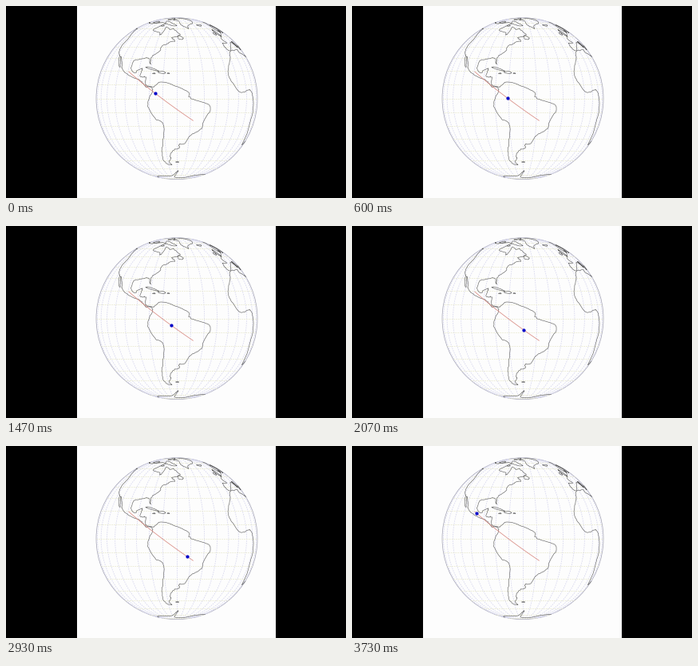
Animation, 426 px wide and 240 px high, one loop 3790 ms. Source, as a matplotlib script:

```python
import numpy as np
import matplotlib.pyplot as plt
from matplotlib.animation import FuncAnimation
from matplotlib.patches import Circle, Rectangle

W, H, DPI = 426, 240, 100
FRAMES, LOOP_MS = 57, 3790
CX, CY, R = 214.0, 115.7, 101.0
LON0 = -60
PAPER, COAST, RIM = "#fdfdfd", "#5c5c5c", "#a0a0b2"
MERIDIAN, PARALLEL = "#d6d6ee", "#e8e8cc"
ROUTE, DOT = "#d88880", "#0000c8"
START, END = (-99.1, 19.4), (-47.9, -15.8)
STEPS, FIRST = 96, 43

rng = np.random.default_rng(4)


def px(width):
    """Line width in pixels, given to matplotlib in points."""
    return width * 72 / DPI


def sphere(lon, lat):
    lon, lat = np.radians(np.asarray(lon, float) - LON0), np.radians(lat)
    return np.array([np.cos(lat) * np.sin(lon),
                     np.sin(lat) * np.ones_like(lon),
                     np.cos(lat) * np.cos(lon)])


def to_stage(p):
    """Orthographic view of the near side; the far side is dropped."""
    hidden = p[2] < -1e-6
    return (np.where(hidden, np.nan, CX + R * p[0]),
            np.where(hidden, np.nan, CY - R * p[1]))


def along_route(f):
    a, b = sphere(*START), sphere(*END)
    w = np.arccos(a @ b)
    f = np.asarray(f, float)
    return to_stage((np.multiply.outer(a, np.sin((1 - f) * w))
                     + np.multiply.outer(b, np.sin(f * w))) / np.sin(w))


def smooth(points, n=6):
    """Catmull-Rom curve through the key points."""
    p = np.array(points, float)
    p = np.vstack([2 * p[0] - p[1], p, 2 * p[-1] - p[-2]])
    t = np.arange(n)[:, None] / n
    a, b, c, d = p[:-3, None], p[1:-2, None], p[2:-1, None], p[3:, None]
    curve = b + ((c - a) * t + (2 * a - 5 * b + 4 * c - d) * t**2
                 + (3 * b - a - 3 * c + d) * t**3) / 2
    return np.vstack([curve.reshape(-1, 2), p[-2]])


fig = plt.figure(figsize=(W / DPI, H / DPI), dpi=DPI, facecolor="black")
ax = fig.add_axes([0, 0, 1, 1])
ax.set_xlim(0, W)
ax.set_ylim(H, 0)
ax.axis("off")
ax.add_patch(Rectangle((89, 0), 249, H, color=PAPER, lw=0))


def trace(lon, lat, color, width, **style):
    ax.plot(*to_stage(sphere(lon, lat)), color=color, lw=px(width), **style)


def coast(points):
    curve = smooth(points)
    curve[1:-1] += rng.normal(0, 0.22, curve[1:-1].shape)
    trace(*curve.T, COAST, 0.6)


def island(lon, lat, length, height, tilt):
    a, turn = np.linspace(0, 2 * np.pi, 25), np.radians(tilt)
    rough = 1 + 0.12 * np.sin(3 * a + lon) + 0.08 * np.sin(5 * a + lat)
    u, v = length * rough * np.cos(a), height * rough * np.sin(a)
    trace(lon + u * np.cos(turn) - v * np.sin(turn),
          lat + u * np.sin(turn) + v * np.cos(turn), COAST, 0.6)


# Graticule
span = np.linspace(-80, 80, 121)
for lon in range(-140, 21, 10):
    trace(np.full_like(span, lon), span, MERIDIAN, 0.8, dashes=(2, 1.5))
around = np.linspace(LON0 - 90, LON0 + 90, 121)
for lat in range(-80, 81, 10):
    trace(around, lat, PARALLEL, 0.8, dashes=(2, 1.5))
ax.add_patch(Circle((CX, CY), R, fill=False, ec=RIM, lw=px(0.7)))

# North and Central America, Pacific side
coast([(-150, 60), (-140, 59.8), (-131, 55), (-124, 48), (-124.3, 40.5),
       (-120.6, 34.6), (-117, 32.3), (-114.5, 28), (-110, 22.9),
       (-112.5, 28.4), (-114.5, 31.5), (-109.3, 25.9), (-105.5, 20.5),
       (-96, 15.8), (-87.7, 12.9), (-83, 8.3), (-79.5, 8.5), (-77.5, 6.5)])
# South America
coast([(-77.5, 6.5), (-80.5, -1.5), (-81, -5.5), (-76.3, -14), (-70.3, -18.5),
       (-71.6, -31), (-73.7, -39), (-75, -48), (-72.5, -53.5), (-66, -55),
       (-68.8, -51.5), (-66, -47.5), (-67, -45.5), (-64.8, -41.5), (-62, -39),
       (-57.5, -37.5), (-58, -34.3), (-53.5, -33.8), (-48.6, -27),
       (-41.5, -22.5), (-39, -15), (-34.9, -7), (-39, -3.3), (-50, 0),
       (-52, 4.8), (-61, 9), (-71.5, 11.8), (-76.8, 8.3)])
# Caribbean, Gulf and Atlantic side
coast([(-76.8, 8.3), (-81, 8.9), (-83.6, 11), (-83.5, 15.3), (-88.3, 16),
       (-87.2, 21.3), (-90.7, 20.7), (-93.5, 18.4), (-97.5, 22),
       (-97.2, 27.5), (-90, 29.4), (-84, 30), (-81.3, 25.5), (-81.2, 31),
       (-75.8, 35.5), (-74, 40.5), (-70.3, 42), (-66.5, 44.5), (-62, 45.5),
       (-65, 48.8), (-60, 50.2), (-56, 52.3)])
# Labrador, Hudson Bay and the Arctic shore
coast([(-56, 52.3), (-62, 57.5), (-65, 60), (-69, 58.8), (-76, 62.4),
       (-77, 57), (-79.5, 52), (-82.3, 55), (-93.5, 58), (-87, 64.5),
       (-82, 68.5), (-95, 70), (-115, 68), (-135, 69.3), (-150, 70.6)])
# Greenland
coast([(-43.5, 60), (-53, 66.5), (-56, 74), (-70, 77), (-35, 83.5), (-20, 77),
       (-25, 70), (-40, 65), (-43.5, 60)])
# Europe
coast([(29, 41), (23, 37), (19, 41.5), (13, 45), (17, 39), (9, 44.3),
       (0, 39.5), (-5.5, 36), (-9.2, 39), (-8.8, 43.2), (-1.5, 43.5),
       (-4.5, 48.4), (8, 54), (10, 57), (20, 54.5), (27, 60), (22, 65.5),
       (14, 56), (6, 58.5), (13, 66.5), (28, 71)])
# Africa
coast([(29, 31), (20, 32.5), (10.5, 35), (10, 37), (-5.5, 35.6), (-10, 30),
       (-17, 21), (-17, 14), (-8, 4.6), (4, 6.3), (9.3, 3.5), (13, -7),
       (12, -16.5), (15, -26), (19, -34.5), (29, -32)])
# Antarctica
coast([(-150, -77), (-105, -73), (-72, -72.5), (-58, -63.3), (-62, -70),
       (-65, -77), (-35, -78), (-10, -71), (30, -69.5)])

island(-79.5, 21.6, 5.4, 0.6, -16)    # Cuba
island(-71.3, 18.9, 2.8, 0.8, -5)     # Hispaniola
island(-77.3, 18.1, 1.0, 0.3, 0)      # Jamaica
island(-66.4, 18.2, 0.8, 0.3, 0)      # Puerto Rico
island(-56.2, 48.9, 3.0, 1.8, -25)    # Newfoundland
island(-59.5, -51.7, 1.6, 0.5, 0)     # Falklands
island(-74, 68.5, 13, 2.4, -18)       # Baffin
island(-110, 71, 8, 1.8, 0)           # Victoria
island(-78, 79.8, 11, 2.5, 8)         # Ellesmere
island(-84, 64.5, 2.5, 1.0, 0)        # Southampton
island(-19, 65, 4.8, 1.2, 0)          # Iceland
island(-2.5, 54.3, 4.2, 1.8, 115)     # Great Britain
island(-8, 53.4, 2.0, 1.6, 0)         # Ireland

ax.plot(*along_route(np.linspace(0, 1, 80)), color=ROUTE, lw=px(0.75))
dot, = ax.plot([], [], "o", color=DOT, ms=px(4.2), mew=0, zorder=5)


def update(i):
    x, y = along_route((i + FIRST) % STEPS / (STEPS - 1))
    dot.set_data([x], [y])
    return dot,


anim = FuncAnimation(fig, update, frames=FRAMES, interval=LOOP_MS / FRAMES,
                     repeat=True, repeat_delay=0, blit=False)
plt.show()
```
